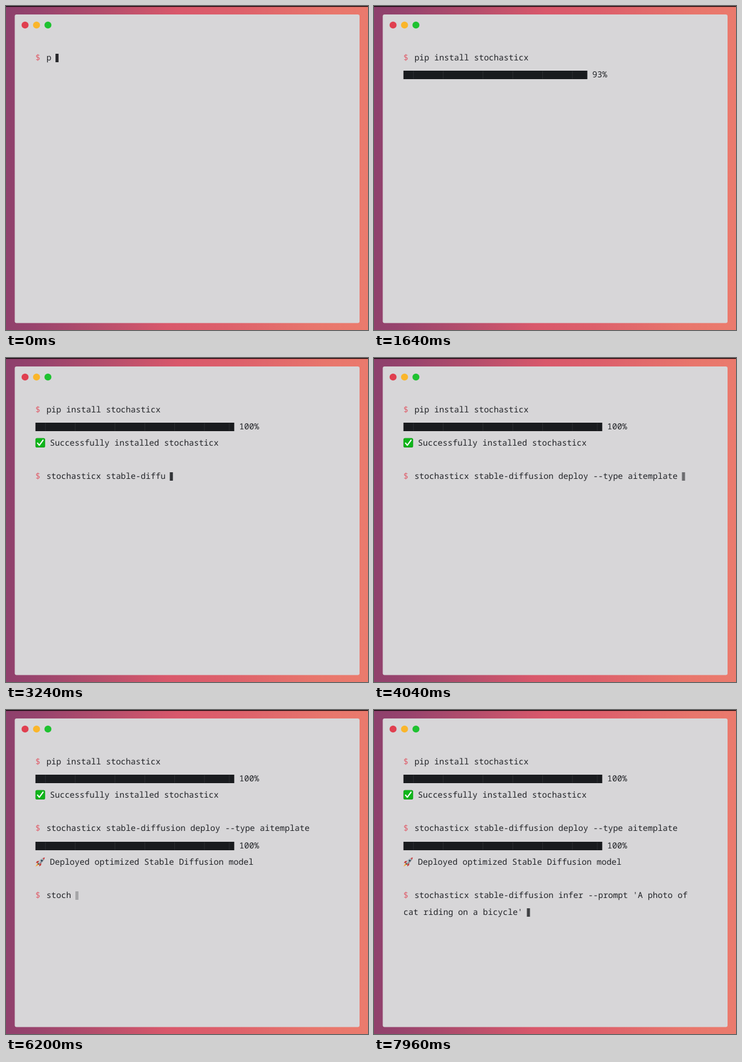
An HTML page that plays this animation: 600 px wide and 536 px high, repeating every 8 s.

```html
<!DOCTYPE html>
<html lang="en">
<head>
<meta charset="utf-8">
<title>Terminal session</title>
<style>
  html, body { margin: 0; width: 100%; height: 100%; overflow: hidden; }
  body {
    background: linear-gradient(92deg, #8d406c 0, #97436d 9%, #b54e6c 27%,
      #d9586b 46%, #dd606b 62%, #e8766c 86%, #eb7b6d 100%);
  }
  svg { display: block; width: 100vw; height: 100vh; }
  text {
    font: 13.73px "Noto Sans Mono", "DejaVu Sans Mono", monospace;
    fill: #212327;
    white-space: pre;
    text-rendering: geometricPrecision;
  }
  .prompt { fill: #df606d; }
  .bar, .cursor { fill: #191b1e; }
  .seam { fill: #2c2e31; }
</style>
</head>
<body>
<svg id="stage" viewBox="0 0 600 536">
  <rect width="600" height="1.3" fill="#0c0508"/>
  <rect x="14.5" y="14" width="571.5" height="510.5" rx="3" fill="#d7d6d8"/>
  <circle cx="31.6" cy="31.5" r="5.8" fill="#e03f50"/>
  <circle cx="50.6" cy="31.5" r="5.8" fill="#fab62b"/>
  <circle cx="69.5" cy="31.5" r="5.8" fill="#1fc231"/>

  <g id="check" transform="translate(48.8 132.5)">
    <rect width="16" height="15.6" rx="2.6" fill="#0a9a12"/>
    <rect x=".8" y=".6" width="14.4" height="13.8" rx="2" fill="#0fb51a"/>
    <path d="M3.4 8.2 6.4 11.8 12.6 3.4" fill="none" stroke="#fff" stroke-width="2"
      stroke-linecap="round" stroke-linejoin="round"/>
  </g>

  <g id="rocket" transform="translate(48.8 243.4)">
    <path d="M4 9 0 15.6 6.800 12Z" fill="#f3a33a"/>
    <path d="M6.500 6.200 2.600 6.600.6 9.800 4.800 9.400ZM9.800 9.600 9.400 13.400 6.200 15.400 6.600 11.200Z" fill="#c23a3c"/>
    <path d="M4.200 10.200Q6.200 3.200 15.400.6 13 9.600 5.900 11.900Z" fill="#8d959b"/>
    <path d="M4.800 9Q7.500 3.200 14.600 1.200L5 11Z" fill="#c6ccd0"/>
    <path d="M11.600 1.900 15.600.4 14.200 4.500Q13.500 2.600 11.600 1.900Z" fill="#cf3b3e"/>
    <circle cx="10.300" cy="5.700" r="1.700" fill="#2f4a5c"/>
    <path d="M4.300 9.500 6.500 11.700 5.200 12.600 3.400 10.800Z" fill="#3c4348"/>
  </g>
</svg>
<script>
const LOOP = 8000, STEP = 21.4, BLINK = 500;
const CHAR = 8.238, LEFT = 48.8, INPUT_LEFT = 66.9, ICON_TEXT_LEFT = 72.7;
const BAR_CELLS = 40, SEAMS = [2, 8, 16, 22, 28, 34, 39];
const stage = document.getElementById('stage');

function add(tag, attrs, text = '') {
  const el = document.createElementNS(stage.namespaceURI, tag);
  for (const key in attrs) el.setAttribute(key, attrs[key]);
  el.textContent = text;
  return stage.appendChild(el);
}

const show = (el, on) => el.setAttribute('visibility', on ? 'visible' : 'hidden');
const stepsSince = (start, t, max) =>
  Math.max(0, Math.min(max, Math.floor((t - start) / STEP)));

// The CSS "ease" curve: cubic-bezier(.25, .1, .25, 1)
function ease(x) {
  const curve = (a, b, u) => 3 * a * u * (1 - u) ** 2 + 3 * b * u * u * (1 - u) + u ** 3;
  let low = 0, high = 1;
  for (let i = 0; i < 20; i++) {
    const mid = (low + high) / 2;
    if (curve(.25, .25, mid) < x) low = mid; else high = mid;
  }
  return curve(.1, 1, low);
}

function blinkOpacity(elapsed) {
  const phase = (elapsed % BLINK) / BLINK * 2;
  return phase < 1 ? 1 - ease(phase) : ease(phase - 1);
}

// A typed command; a second row takes the text after the word wrap.
function command(start, end, rows) {
  const prompt = add('text', { x: LEFT, y: rows[0].y, class: 'prompt' }, '$');
  const lines = rows.map((row, i) => ({
    ...row, x: i ? LEFT : INPUT_LEFT, el: add('text', { x: i ? LEFT : INPUT_LEFT, y: row.y })
  }));
  const cursor = add('rect', { width: 5.1, height: 14, class: 'cursor' });
  const total = rows.reduce((sum, row) => sum + row.text.length, 0);

  return t => {
    let left = stepsSince(start, t, total);
    show(prompt, t >= start);
    lines.forEach((line, i) => {
      const count = Math.min(left, line.text.length);
      line.el.textContent = line.text.slice(0, count);
      if (i === 0 || count) {
        cursor.setAttribute('x', line.x + count * CHAR + 6.9);
        cursor.setAttribute('y', line.y - 11);
      }
      left -= count;
    });
    const active = t >= start && t < end;
    show(cursor, active);
    if (active) cursor.setAttribute('opacity', blinkOpacity(t - start));
  };
}

function progress(start, y) {
  const bar = add('rect', { x: LEFT, y: y - 11, height: 14, class: 'bar' });
  const seams = SEAMS.map(cell => ({
    cell, el: add('rect', { x: LEFT + cell * CHAR - .5, y: y - 10.5, width: 1, height: 13, class: 'seam' })
  }));
  const label = add('text', { y });

  return t => {
    const cells = stepsSince(start, t, BAR_CELLS);
    bar.setAttribute('width', cells * CHAR);
    seams.forEach(seam => show(seam.el, seam.cell < cells));
    label.setAttribute('x', LEFT + (cells + 1) * CHAR);
    label.textContent = cells ? Math.round(cells / BAR_CELLS * 100) + '%' : '';
  };
}

function message(start, y, iconId, text) {
  const parts = [document.getElementById(iconId), add('text', { x: ICON_TEXT_LEFT, y }, text)];
  return t => parts.forEach(el => show(el, t >= start));
}

const scene = [
  command(-22, 836, [{ y: 90, text: 'pip install stochasticx' }]),
  progress(836, 118),
  message(2035, 145, 'check', 'Successfully installed stochasticx'),
  command(2710, 4189, [
    { y: 200, text: 'stochasticx stable-diffusion deploy --type aitemplate' }
  ]),
  progress(4189, 229),
  message(5390, 256, 'rocket', 'Deployed optimized Stable Diffusion model'),
  command(6088, LOOP, [
    { y: 311, text: "stochasticx stable-diffusion infer --prompt 'A photo of " },
    { y: 339, text: "cat riding on a bicycle'" }
  ])
];

let origin;
function frame(now) {
  origin ??= now;
  const t = (now - origin) % LOOP;
  scene.forEach(draw => draw(t));
  requestAnimationFrame(frame);
}
scene.forEach(draw => draw(0));
requestAnimationFrame(frame);
</script>
</body>
</html>
```
